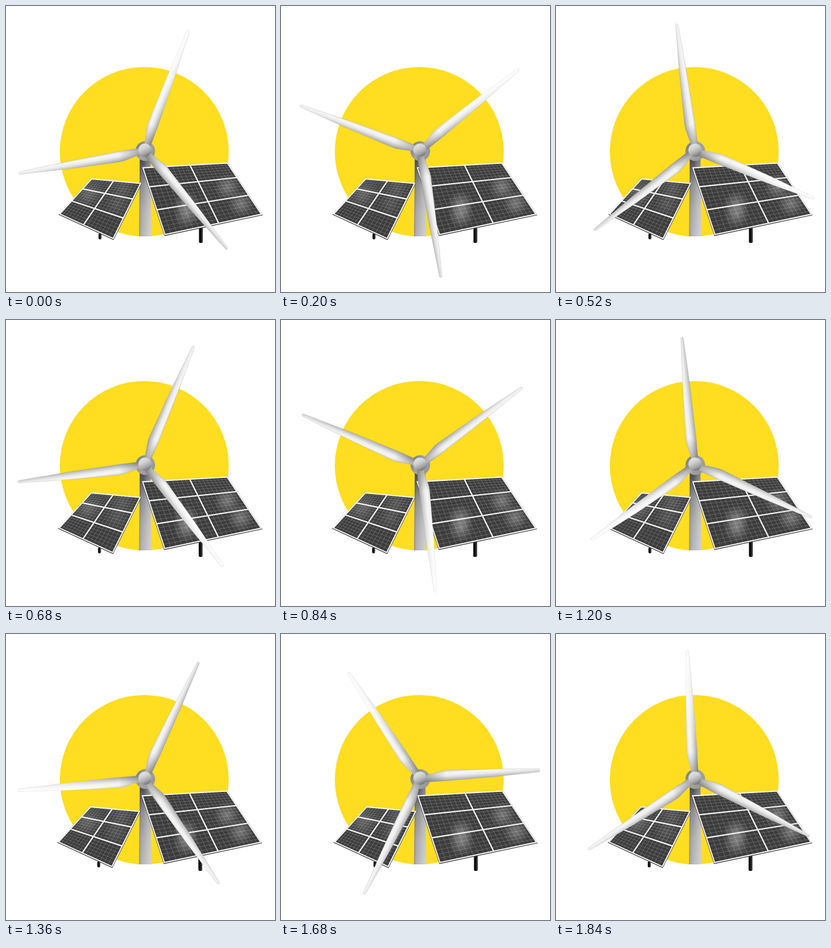
These frames come from a looping animation (451 px wide and 478 px high, 2 s). An HTML page with a canvas:

```html
<!DOCTYPE html>
<html lang="en">
<head>
<meta charset="utf-8">
<title>Wind and solar</title>
<style>
html, body { margin: 0; width: 100%; height: 100%; overflow: hidden; background: #fff; }
canvas { display: block; }
</style>
</head>
<body>
<canvas id="stage" width="451" height="478"></canvas>
<script>
const c = document.getElementById('stage').getContext('2d');
const LOOP = 2000, TURN = 30.6;

// corners run clockwise from the top left
const left = {
  quad: [[142.5, 289], [224.5, 296.5], [178.5, 388.5], [89, 347.5]],
  skew: -.22, post: [154, 380, 5, 10], cols: 16, sway: 1.2, shine: [.2, .5, .12]
};
const right = {
  quad: [[229, 270.5], [370.5, 262.5], [427.5, 348], [266, 382]],
  skew: .23, post: [323, 369, 6.5, 27], cols: 20, sway: .6, shine: [.24, .8, .3]
};

function ramp(x0, y0, x1, y1, ...colors) {
  const g = c.createLinearGradient(x0, y0, x1, y1);
  colors.forEach((color, i) => g.addColorStop(i / (colors.length - 1), color));
  return g;
}

function glow(x, y, r, ...colors) {
  const g = c.createRadialGradient(x, y, 0, x, y, r);
  colors.forEach((color, i) => g.addColorStop(i / (colors.length - 1), color));
  return g;
}

function disc(x, y, r, fill) {
  c.beginPath();
  c.arc(x, y, r, 0, 7);
  c.fillStyle = fill;
  c.fill();
}

function poly(points) {
  c.beginPath();
  points.forEach(p => c.lineTo(...p));
  c.closePath();
}

function outline(width, color) {
  c.lineWidth = width;
  c.strokeStyle = color;
  c.stroke();
}

const white = alpha => `rgba(255,255,255,${alpha})`;
const mix = (a, b, t) => a.map((v, i) => v + (b[i] - v) * t);
const bend = (t, k) => t + k * t * (1 - t);

function drawPanel({ quad, skew, post, cols, sway, shine }, step) {
  const [tl, tr, br, bl] = quad;
  const at = (u, v) => {
    u = bend(u, skew);
    v = bend(v, -.2) + .4 * v * (1 - v);
    v = bend(v, -.4);
    return mix(mix(tl, tr, u), mix(bl, br, u), v);
  };
  const grid = (nx, ny, width, color) => {
    c.beginPath();
    for (let i = 1; i < nx; i++) { c.moveTo(...at(i / nx, 0)); c.lineTo(...at(i / nx, 1)); }
    for (let j = 1; j < ny; j++) { c.moveTo(...at(0, j / ny)); c.lineTo(...at(1, j / ny)); }
    outline(width, color);
  };

  c.save();
  c.translate(-sway * Math.cos((step - 5) * Math.PI * 2 / 3.4), 0);
  const [x, y, w, h] = post;
  c.beginPath();
  c.roundRect(x, y, w, h, 2);
  c.fillStyle = ramp(x, 0, x + w, 0, '#000', '#111', '#555');
  c.fill();

  // dark underside below the white frame
  poly(quad.map(([px, py]) => [px, py + .8]));
  outline(2.8, '#444');

  poly(quad);
  c.fillStyle = '#3c3c3c';
  c.fill();
  c.save();
  c.clip();
  const [u, v, alpha] = shine;
  for (const [su, sv] of [[u, v], [u + .04, v - .15], [u + .6, v - .02], [u + .56, v - .32]]) {
    const p = at(su, sv);
    disc(...p, 22, glow(...p, 22, white(alpha), white(0)));
  }
  grid(cols, 18, .5, white(.38));
  grid(2, 3, 2.2, '#f4f4f4');
  c.restore();
  poly(quad);
  outline(1.9, '#fafafa');
  c.restore();
}

function drawTower() {
  poly([[224.5, 242], [242, 242], [243.5, 385], [223, 385]]);
  c.fillStyle = ramp(0, 256, 0, 385, '#404040', '#8c8c8c', '#a8a8a8', '#b4b4b4');
  c.fill();
  c.fillStyle = ramp(223, 0, 243.5, 0, 'rgba(0,0,0,.2)', white(.05), white(.25), white(.4));
  c.fill();
}

// one blade pointing up; the wide corner sits on its trailing side
function drawBlade(index, degrees) {
  const tones = ['#d6d6d6', '#f6f6f6', '#ececec', '#c9c9c9', '#a2a2a2'];
  if (index === 2) tones.reverse();
  c.save();
  c.rotate(degrees * Math.PI / 180);
  poly([[-5, -6], [-5.5, -14], [-10.5, -38], [-11, -46], [-7.5, -130], [-2.2, -213],
    [0, -215], [2, -213], [5, -130], [6.5, -46], [6, -6]]);
  c.fillStyle = ramp(-11, 0, 7, 0, ...tones);
  c.fill();
  // shade at the root, and a first blade that fades to white
  c.fillStyle = ramp(0, -8, 0, -45, 'rgba(60,60,60,.4)', 'rgba(60,60,60,0)');
  c.fill();
  if (index === 0) {
    c.fillStyle = ramp(0, -50, 0, -215, white(0), white(.65), white(.95));
    c.fill();
  }
  outline(.5, `rgba(130,130,130,${index ? .45 : .25})`);
  c.restore();
}

function drawRotor(step) {
  disc(233.5, 242.5, 16.5, ramp(217, 230, 250, 250, '#777', '#a4a4a4', '#959595'));
  c.save();
  c.beginPath();
  c.rect(0, 0, 434, 478);
  c.clip();
  c.translate(233, 242);
  for (let i = 0; i < 3; i++) drawBlade(i, 20 + TURN * step + 120 * i);
  c.restore();
  disc(233, 241, 11, ramp(227, 231, 237, 252, '#e4e4e4', '#d2d2d2', '#ababab', '#707070'));
}

function draw(now) {
  // every second holds six poses, the first a little longer
  const t = now % LOOP;
  const step = 6 * Math.floor(t / 1000) + Math.max(0, Math.floor((t % 1000 - 40) / 160));
  c.fillStyle = '#fff';
  c.fillRect(0, 0, 451, 478);
  disc(231.8, 243.5, 141.6, '#ffdd20');
  drawTower();
  drawPanel(left, step);
  drawPanel(right, step);
  drawRotor(step);
}

const begin = performance.now();
function tick() {
  draw(performance.now() - begin);
  requestAnimationFrame(tick);
}
tick();
</script>
</body>
</html>
```
